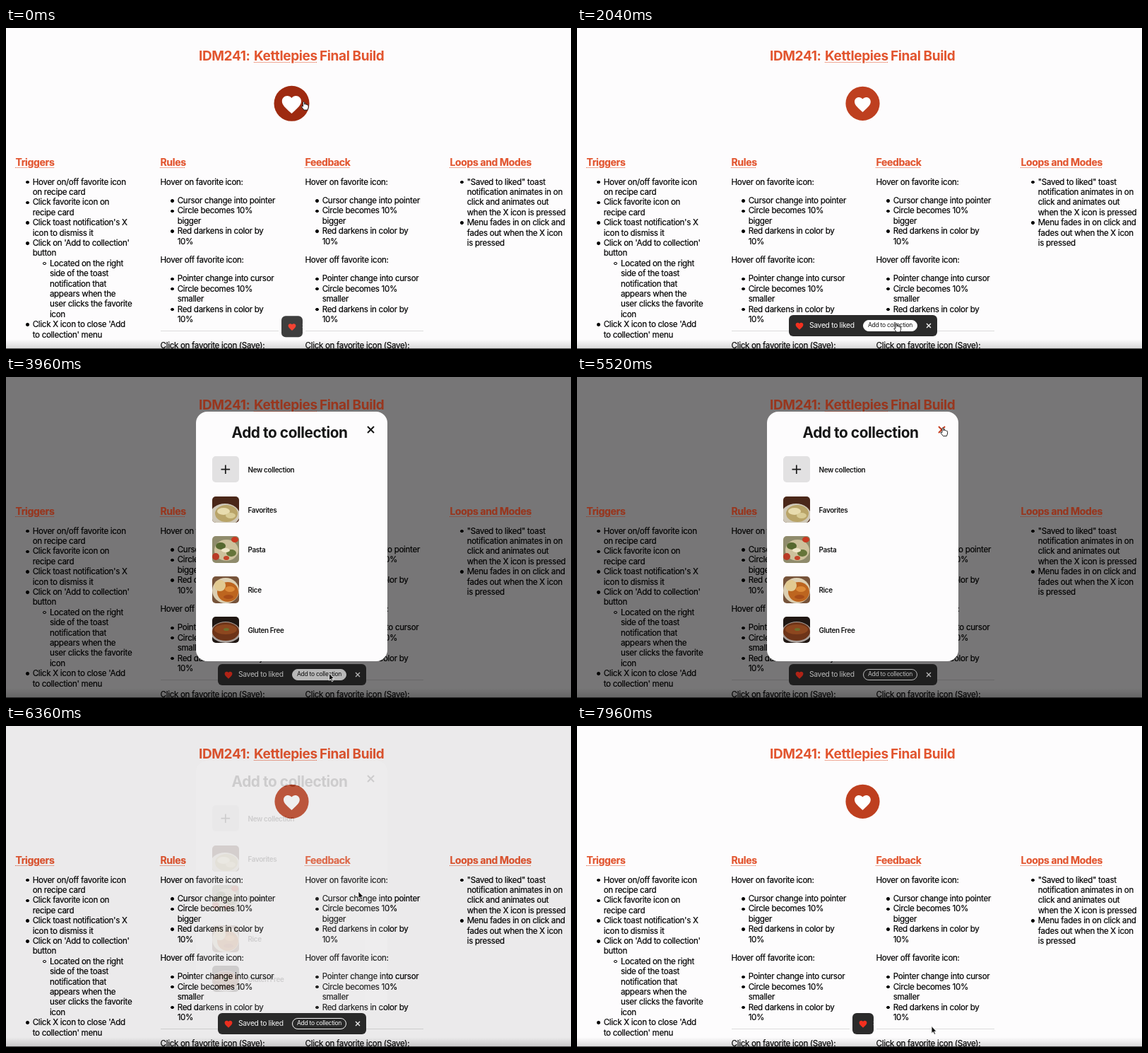
These frames come from a looping animation (800x454 px, 8000 ms). An HTML page:

```html
<!DOCTYPE html>
<html lang="en">
<head>
<meta charset="utf-8">
<title>Final Build</title>
<style>
html, body { margin: 0; width: 100%; height: 100%; overflow: hidden; background: #fdfcfd; }
#stage { position: relative; width: 800px; height: 454px; overflow: hidden; background: #fdfcfd;
  font: 11.6px/14.4px Inter, "Open Sans", sans-serif; letter-spacing: -.027em; color: #000; white-space: nowrap; }
#stage > *, .abs { position: absolute; }
h1, h2, h3, p, ul { margin: 0; }
h1, h2 { color: var(--accent); font-weight: 700; z-index: 1; }
h1 { top: 28px; font-size: 19px; line-height: 24px; letter-spacing: -.02em; }
h1 span { position: absolute; }
h2 { position: absolute; top: -29.6px; font-size: 14px; line-height: 18px; letter-spacing: -.025em; }
h2, u { text-decoration: underline dotted 1.2px; text-underline-offset: 2px; }
.col { top: 210.6px; width: 167px; -webkit-text-stroke: .18px; }
.col p { margin-bottom: 12px; }
.col ul { padding-left: 24.2px; list-style: none; }
.col p + ul { margin-bottom: 12px; }
li { position: relative; }
li::before { content: ""; position: absolute; left: -9.4px; top: 5.2px; width: 4.4px; height: 4.4px;
  box-sizing: border-box; border: .7px solid #000; border-radius: 50%; background: #000; }
li li::before { background: none; }
hr { margin: -3px 0 12.2px; border: 0; border-top: 1px solid #dcdcdc; }
#foot { left: 0; top: 440px; width: 800px; height: 13px; border-bottom: 1px solid #444;
  background: linear-gradient(transparent, rgba(0,0,0,.14)); }
#shade { inset: 0; background: #000; }
#toast { top: 405.5px; height: 30px; border-radius: 6px; background: #2b2b2b; color: #fff; overflow: hidden; z-index: 1; }
#toast span { position: absolute; left: 29.5px; top: 7.6px; font-size: 10.3px; letter-spacing: -.03em; }
#add { position: absolute; left: 105.5px; top: 7.5px; width: 77px; height: 15.5px; box-sizing: border-box;
  border: 1px solid #fff; border-radius: 8px; text-align: center; font-size: 8.6px; line-height: 13.5px; }
#modal { left: 269px; top: 48.8px; width: 270.5px; height: 353.6px; border-radius: 16px; background: #fdfcfd; color: #161616; z-index: 2; }
h3 { position: absolute; left: 50.5px; top: 17.2px; font-size: 20.8px; line-height: 26px; letter-spacing: -.02em; }
.row { position: absolute; left: 23px; height: 37.5px; }
.row svg { position: absolute; border-radius: 5px; }
.row b { position: absolute; left: 50.5px; top: 12px; font-size: 9.9px; font-weight: 600; letter-spacing: -.035em; }
.x { fill: none; stroke-width: 1.3; }
svg { overflow: visible; left: 0; top: 0; }
.row svg { overflow: hidden; }
#top { z-index: 3; }
</style>
</head>
<body>
<div id="stage">
  <h1><span style="left:273px">IDM241:</span><span style="left:351px"><u>Kettlepies</u></span><span style="left:444px">Final Build</span></h1>
  <svg width="800" height="454">
    <circle id="disc" cx="404.5" cy="106.8"/>
    <path id="heart" fill="#fff"/>
  </svg>

  <div class="col" style="left:13.5px"><h2>Triggers</h2>
    <ul>
      <li>Hover on/off favorite icon<br>on recipe card</li>
      <li>Click favorite icon on<br>recipe card</li>
      <li>Click toast notification's X<br>icon to dismiss it</li>
      <li>Click on 'Add to collection'<br>button
        <ul><li>Located on the right<br>side of the toast<br>notification that<br>appears when the<br>user clicks the favorite<br>icon</li></ul>
      </li>
      <li>Click X icon to close 'Add<br>to collection' menu</li>
    </ul>
  </div>
  <div class="col rules" style="left:218.5px"><h2>Rules</h2></div>
  <div class="col rules" style="left:423.5px"><h2>Feedback</h2></div>
  <div class="col" style="left:628.5px"><h2>Loops and Modes</h2>
    <ul>
      <li>"Saved to liked" toast<br>notification animates in on<br>click and animates out<br>when the X icon is pressed</li>
      <li>Menu fades in on click and<br>fades out when the X icon<br>is pressed</li>
    </ul>
  </div>
  <div id="foot"></div>

  <div id="shade"></div>
  <div id="toast">
    <svg class="abs" width="210" height="30"><path id="love" fill="#f3301f"/><path id="toastX" class="x" d="M195 12l6 6m0-6l-6 6"/></svg>
    <span>Saved to liked</span>
    <div id="add">Add to collection</div>
  </div>
  <div id="modal">
    <h3>Add to collection</h3>
    <svg class="abs" width="269" height="353"><path id="modalX" class="x" style="stroke-width:2" d="M243 21l9 9m0-9l-9 9"/></svg>
  </div>
  <svg id="top" width="800" height="454">
    <g id="cursor">
      <path id="arrow" d="M0 0V10.2L2.3 8.1L3.9 11.8L5.6 11L4 7.5H7.1Z" fill="#111" stroke="#fff" stroke-width=".8"/>
      <path id="hand" d="M-1 1Q0-.4 1.1 1V4.2Q2-.0 3 4.3Q4.2 3.4 4.8 4.8Q6.6 4.2 6.6 6V8.5L5.4 12H.4L-3 7.6Q-3.4 5.7-1 7Z" fill="#fff" stroke="#111" stroke-width=".9" stroke-linejoin="round"/>
    </g>
  </svg>
</div>
<script>
const $ = id => document.getElementById(id);
const HEART = "M12 21.3l-1.4-1.3C5.4 15.4 2 12.3 2 8.5 2 5.4 4.4 3 7.5 3c1.7 0 3.4.8 4.5 2.1C13.1 3.8 14.8 3 16.5 3 19.6 3 22 5.4 22 8.5c0 3.8-3.4 6.9-8.5 11.5z";
$("heart").setAttribute("d", HEART);
$("love").setAttribute("d", HEART);
$("love").setAttribute("transform", "translate(15 15.7) scale(.54) translate(-12 -12)");

const rules = (name, change, size) => `<p>${name} favorite icon:</p><ul>
  <li>${change}</li><li>Circle becomes 10%<br>${size}</li><li>Red darkens in color by<br>10%</li></ul>`;
for (const col of document.querySelectorAll(".rules"))
  col.innerHTML += rules("Hover on", "Cursor change into pointer", "bigger") +
    rules("Hover off", "Pointer change into cursor", "smaller") + "<hr><p>Click on favorite icon (Save):</p>";

// Simplified dishes: backdrop, then ellipses as [x, y, rx, ry, colour]
const dishes = [
  ["New collection", "#e2e1e2", []],
  ["Favorites", "#4a2719", [[18, 26, 21, 16, "#cfc8b8"], [20, 24, 16, 12, "#b9a468"], [16, 21, 9, 5, "#e8dcae"], [26, 27, 7, 4, "#d9cb95"]]],
  ["Pasta", "#8f8b6c", [[20, 20, 17, 15, "#cdc19c"], [12, 14, 7, 5, "#56682f"], [27, 24, 7, 5, "#66753a"], [32, 5, 5, 4, "#c93a22"], [5, 29, 5, 5, "#b83a25"], [20, 31, 4, 3, "#c4452a"], [19, 20, 6, 3, "#efe6c8"]]],
  ["Rice", "#76533a", [[19, 20, 19, 18, "#dccfb2"], [22, 22, 15, 14, "#bd651f"], [11, 13, 8, 8, "#e2ca91"], [25, 18, 7, 4, "#dd8b38"], [23, 29, 7, 3, "#a84d18"]]],
  ["Gluten Free", "#201713", [[19, 22, 21, 15, "#aaa19c"], [19, 21, 19, 13, "#6e3418"], [19, 18, 16, 7, "#8d471f"], [20, 18, 4, 2, "#70702c"]]]
];
dishes.forEach(([name, back, spots], i) => {
  const art = spots.map(([x, y, rx, ry, c]) => `<ellipse cx="${x}" cy="${y}" rx="${rx}" ry="${ry}" fill="${c}"/>`).join("");
  const plus = i ? "" : '<path d="M12.5 18.7h12.6m-6.3-6.3v12.6" stroke="#1a1a1a" stroke-width="1.7"/>';
  $("modal").insertAdjacentHTML("beforeend", `<div class="row" style="top:${63.2 + i * 56.7}px">
    <svg width="37.5" height="37.5"><rect width="38" height="38" fill="${back}"/>${art}${plus}</svg><b>${name}</b></div>`);
});

const LOOP = 8000;
// Pointer stops: time, x, y
const stops = [[0, 421.5, 104], [300, 421.5, 104], [1000, 427, 322], [1450, 446, 418], [2050, 452, 418],
  [2500, 497, 418], [2980, 497, 418], [3120, 485.5, 419], [3320, 457.5, 419], [4480, 457.5, 419],
  [4720, 518, 71.5], [6080, 518, 71.5], [6360, 499, 234], [6850, 499, 418], [7460, 499, 418], [7700, 502, 424.5], [8000, 502, 424.5]];
const clamp = p => Math.max(0, Math.min(1, p));
const ease = p => 1 - (1 - clamp(p)) ** 2.4;
const ramp = (t, from, span) => ease((t - from) / span);
const pulse = (t, on, off, span = 150) => ramp(t, on, span) - ramp(t, off, span);
const mix = (a, b, p) => a + (b - a) * p;
const blend = (a, b, p) => `rgb(${a.map((v, i) => Math.round(mix(v, b[i], p)))})`;
const WHITE = [255, 255, 255], DARK = [22, 22, 22], RED = [200, 62, 32];

function pointer(t) {
  const i = stops.findIndex(s => s[0] > t), [t0, x0, y0] = stops[i - 1], [t1, x1, y1] = stops[i];
  const p = (t - t0) / (t1 - t0), s = p * p * (3 - 2 * p);
  return [mix(x0, x1, s), mix(y0, y1, s)];
}

function draw(t) {
  const hover = 1 - ramp(t, 330, 220);
  $("disc").setAttribute("r", mix(24.1, 25, hover));
  $("disc").setAttribute("fill", blend([190, 63, 31], [158, 42, 16], hover));
  $("heart").setAttribute("transform", `translate(404.4 108.4) scale(${mix(1.14, 1.36, hover)}) translate(-12 -12.1)`);

  const shown = pulse(t, 3460, 6090, 480);
  $("shade").style.opacity = shown * .53;
  $("modal").style.opacity = shown;
  $("stage").style.setProperty("--accent", blend([226, 85, 47], [152, 54, 30], shown));

  const enter = ramp(t, -200, 320), wide = pulse(t, 160, 7500, 400), width = mix(30, 210, wide);
  Object.assign($("toast").style, {
    width: width + "px", left: 404.5 - width / 2 + "px", opacity: enter,
    transform: `translateY(${(1 - enter) * 14}px)`, filter: `brightness(${1 - .28 * shown})`
  });
  const lit = pulse(t, 1400, 2220) + pulse(t, 3210, 4500);
  $("add").style.background = `rgba(255,255,255,${lit})`;
  $("add").style.color = blend(WHITE, DARK, lit);
  $("toastX").style.stroke = blend(WHITE, RED, pulse(t, 2400, 3100) + pulse(t, 6800, 7620));
  $("modalX").style.stroke = blend(DARK, RED, pulse(t, 4660, 6130));

  const [x, y] = pointer(t), open = t > 3460 && t < 6080;
  const overToast = y > 412 && y < 426 && wide > .9 && (x > 405 && x < 482 || x > 491 && x < 504);
  const hand = open ? Math.hypot(x - 517, y - 74) < 9 : Math.hypot(x - 404.5, y - 106.6) < 25 || overToast;
  $("cursor").setAttribute("transform", `translate(${x} ${y})`);
  $("hand").style.display = hand ? "" : "none";
  $("arrow").style.display = hand ? "none" : "";
}

const start = performance.now();
(function tick() {
  draw((performance.now() - start) % LOOP);
  requestAnimationFrame(tick);
})();
</script>
</body>
</html>
```
